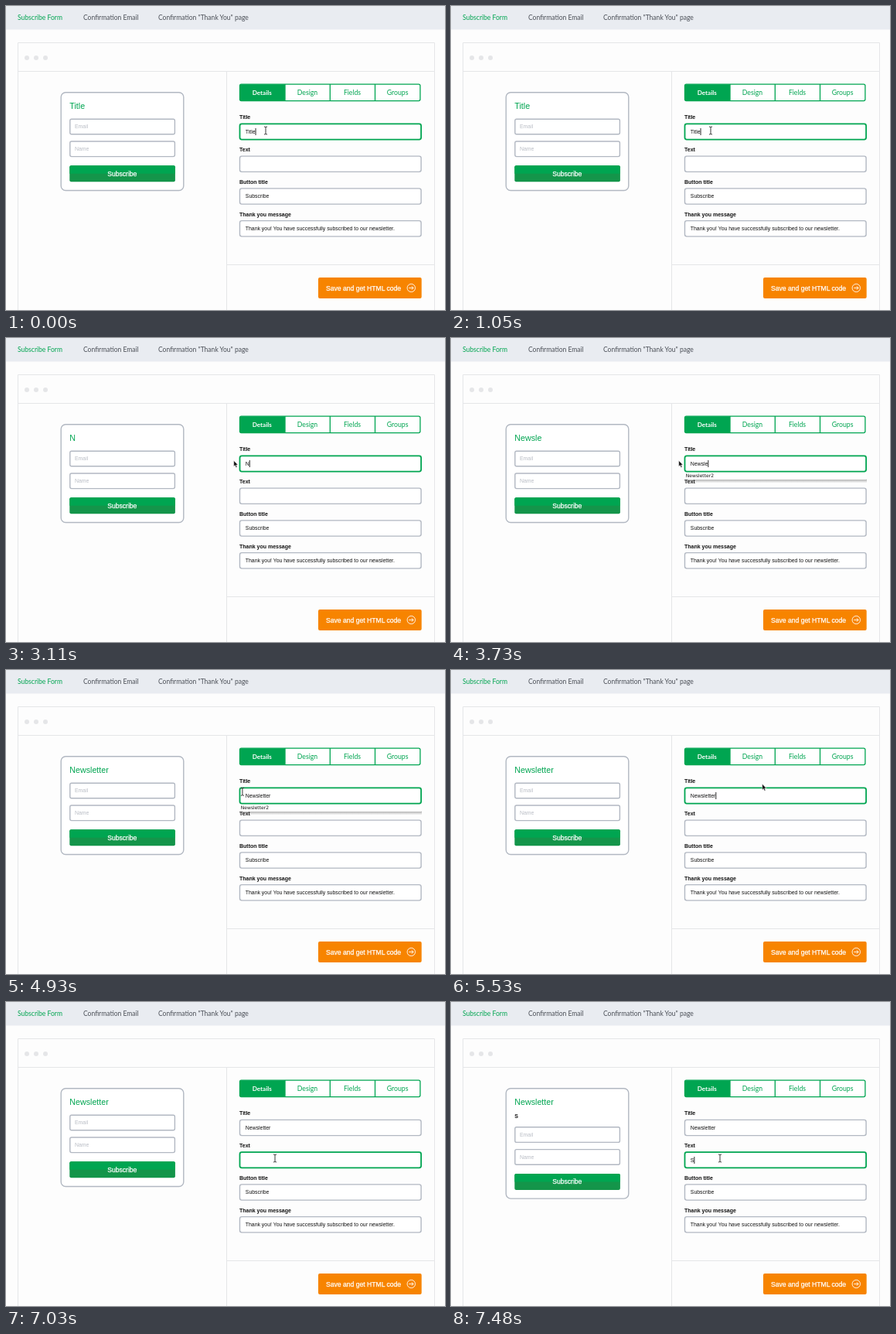
Animation of 568x393 px, one loop 8 s. Source, as an HTML page:

```html
<!DOCTYPE html>
<html lang="en">
<head>
<meta charset="utf-8">
<title>Subscribe form editor</title>
<style>
  html, body { margin: 0; width: 100%; height: 100%; overflow: hidden; background: #fdfdfd; }
  svg { display: block; font: 6.9px "Liberation Sans", Arial, sans-serif; fill: #111; }
  .nav { font: 8.55px Lato, sans-serif; fill: #4b4f57; }
  .tabs { font: 8.7px Lato, sans-serif; fill: #00a551; text-anchor: middle; }
  .tabs .on { font-weight: bold; font-size: 8.1px; fill: #fff; }
  .label { font-size: 7px; font-weight: bold; }
  .hint { fill: #b9bdc5; }
  .rule { fill: none; stroke: #e5e6e8; }
  .box { fill: #fff; stroke: #b2b8c2; stroke-width: 1.4; }
  .button { font-size: 8.6px; fill: #fff; stroke: #fff; stroke-width: .25; }
  .green { fill: #00a551; }
</style>
</head>
<body>
<svg width="568" height="393" viewBox="0 0 568 393">
  <rect width="568" height="393" fill="#fdfdfd"/>
  <rect width="568" height="30.5" fill="#e9ecf1"/>
  <g class="nav">
    <text x="15" y="17.8" class="green">Subscribe Form</text>
    <text x="100" y="17.8">Confirmation Email</text>
    <text x="197" y="17.8">Confirmation "Thank You" page</text>
  </g>
  <path class="rule" d="M15.5 400V47.5H554.5V400M15.5 84.5H554.5M285.5 84.5V400M285.5 334.5H554.5"/>
  <g fill="#e5e6e8">
    <circle cx="27" cy="67" r="3"/><circle cx="39" cy="67" r="3"/><circle cx="51" cy="67" r="3"/>
  </g>

  <rect id="card" class="box" x="71.2" y="111.7" width="158.6" height="126.8" rx="6"/>
  <text id="heading" class="green" x="82.3" y="132.5" font-size="10.7"></text>
  <text id="intro" class="label" x="82.3" y="150.3"></text>
  <g id="form">
    <rect class="box" x="82.8" y="146.2" width="135.6" height="19.6" rx="2"/>
    <rect class="box" x="82.8" y="175" width="135.6" height="19.6" rx="2"/>
    <text class="hint" x="89" y="158.3">Email</text>
    <text class="hint" x="89" y="187.2">Name</text>
    <rect x="82.3" y="206.3" width="136.6" height="21" rx="2" fill="#14954a"/>
    <path class="green" d="M82.3 216.8V208.3a2 2 0 0 1 2-2H216.9a2 2 0 0 1 2 2V216.8z"/>
    <text class="button" x="150.3" y="219.6" text-anchor="middle">Subscribe</text>
  </g>

  <rect x="302.5" y="101.2" width="233.4" height="21.4" rx="2" fill="#fff"/>
  <path class="green" d="M361 101.2H304.5a2 2 0 0 0-2 2V120.6a2 2 0 0 0 2 2H361z"/>
  <rect x="302.5" y="101.2" width="233.4" height="21.4" rx="2" fill="none" stroke="#00a551" stroke-width="1.3"/>
  <path d="M361 101V123M419.3 101V123M477.5 101V123" stroke="#00a551" stroke-width="1.3"/>
  <g class="tabs">
    <text class="on" x="331.3" y="114.7">Details</text>
    <text x="390" y="114.7">Design</text>
    <text x="448" y="114.7">Fields</text>
    <text x="506.6" y="114.7">Groups</text>
  </g>

  <g id="fields"></g>
  <rect id="selection" y="158" height="9" fill="#a8cdf1"/>
  <text id="titleText" x="309.8" y="164.9"></text>
  <text id="bodyText" x="309.8" y="206.7"></text>
  <text x="309.8" y="248.4">Subscribe</text>
  <text x="309.8" y="290.1">Thank you! You have successfully subscribed to our newsletter.</text>
  <rect id="caret" width=".9" height="9"/>

  <g id="suggest">
    <defs>
      <linearGradient id="shade" x2="0" y2="1">
        <stop stop-color="#777" stop-opacity=".6"/><stop offset="1" stop-color="#777" stop-opacity="0"/>
      </linearGradient>
    </defs>
    <rect x="302" y="182.5" width="236" height="5" fill="url(#shade)"/>
    <rect x="302" y="174" width="235.5" height="9" fill="#fff"/>
    <text x="303.8" y="180.4" font-size="6" font-family="DejaVu Sans, sans-serif">Newsletter2</text>
  </g>

  <rect x="404" y="351" width="133.7" height="27" rx="2" fill="#f78400"/>
  <text class="button" x="414" y="367.7">Save and get HTML code</text>
  <g fill="none" stroke="#fff" stroke-width=".9">
    <circle cx="524.3" cy="364.5" r="5.2"/>
    <path d="M521.3 364.5H527M524.8 362.2L527.1 364.5L524.8 366.8"/>
  </g>

  <path id="beam" d="M-2-5Q0-5 0-4Q0-5 2-5M0-4V4M-2 5Q0 5 0 4Q0 5 2 5" fill="none" stroke="#222" stroke-width=".9"/>
  <path id="arrow" d="M0 0V7.6L1.7 6.1L2.9 8.9L4.3 8.3L3.1 5.6H5.4z" stroke="#fff" stroke-width=".5"/>
</svg>
<script>
const LOOP = 8000, STEP = 150, TEXT_X = 309.8;
const GREEN = '#00a551', GREY = '#b2b8c2';
const el = id => document.getElementById(id);
const show = (node, on) => node.setAttribute('visibility', on ? 'visible' : 'hidden');
const attrs = (node, values) => { for (const k in values) node.setAttribute(k, values[k]); };
const between = (t, ...spans) => spans.some(([from, to]) => t >= from && t < to);

el('fields').innerHTML = ['Title', 'Text', 'Button title', 'Thank you message'].map((label, i) => {
  const y = 152.4 + i * 41.75;
  return `<text class="label" x="302" y="${y - 6}">${label}</text>
    <rect class="box" x="302.5" y="${y}" width="234.6" height="20.2" rx="2.5"/>`;
}).join('');
const [titleBox, bodyBox] = document.querySelectorAll('#fields rect');

// Times at which the typed title reaches a given length
const typing = [[2820, 1], [3270, 2], [3420, 3], [3570, 5], [3730, 6], [3880, 7], [4030, 8], [4180, 9], [4330, 10]];
function titleAt(t) {
  const typed = typing.filter(([at]) => t >= at).pop();
  return typed ? 'Newsletter'.slice(0, typed[1]) : 'Title';
}

function pointerAt(t) {
  if (t < 2090) return [336, 161];
  if (t < 2230) return [314, 160.5];
  if (t < 2380) return [296, 160];
  const time = 4930 + Math.floor((t - 4930) / STEP) * STEP;
  const ease = (from, to) => {
    const p = Math.min(1, Math.max(0, (time - from) / (to - from)));
    return p * p * (3 - 2 * p);
  };
  const out = ease(4780, 5530), down = ease(5730, 6430);
  return [294.7 + 108 * out - 54.7 * down, 158.5 - 11.2 * out + 54.7 * down];
}

function draw(t) {
  const title = titleAt(t), body = t >= 7480 ? 'S' : '';
  el('heading').textContent = el('titleText').textContent = title;
  el('intro').textContent = el('bodyText').textContent = body;

  const shift = body ? 15.6 : 0;
  attrs(el('form'), { transform: `translate(0 ${shift})` });
  attrs(el('card'), { height: 126.8 + shift });

  const bodyFocus = t >= 6430, swapped = t >= 6580;
  attrs(titleBox, { style: swapped ? `stroke:${GREY}` : `stroke:${GREEN};stroke-width:1.8` });
  attrs(bodyBox, { style: swapped ? `stroke:${GREEN};stroke-width:1.8` : `stroke:${bodyFocus ? '#94b5a8' : GREY}` });

  const end = TEXT_X + el(bodyFocus ? 'bodyText' : 'titleText').getComputedTextLength();
  const start = t < 2230 ? 314 : TEXT_X;
  attrs(el('selection'), { x: start, width: Math.max(0, end - start) });
  show(el('selection'), between(t, [2090, 2820]));
  attrs(el('caret'), { x: end, y: bodyFocus ? 200 : 158 });
  show(el('caret'), !between(t, [450, 1050], [1640, 2820], [4930, 5530], [6130, 6430], [7030, 7480]));
  show(el('suggest'), between(t, [3270, 5380]));

  const [x, y] = pointerAt(t);
  const overField = x > 302 && between(y, [152, 173], [194, 215]);
  const beam = t < 2380 || overField;
  for (const id of ['beam', 'arrow']) attrs(el(id), { transform: `translate(${x} ${y})` });
  show(el('beam'), beam);
  show(el('arrow'), !beam);
}

function frame() {
  draw(performance.now() % LOOP);
  requestAnimationFrame(frame);
}
frame();
</script>
</body>
</html>
```
